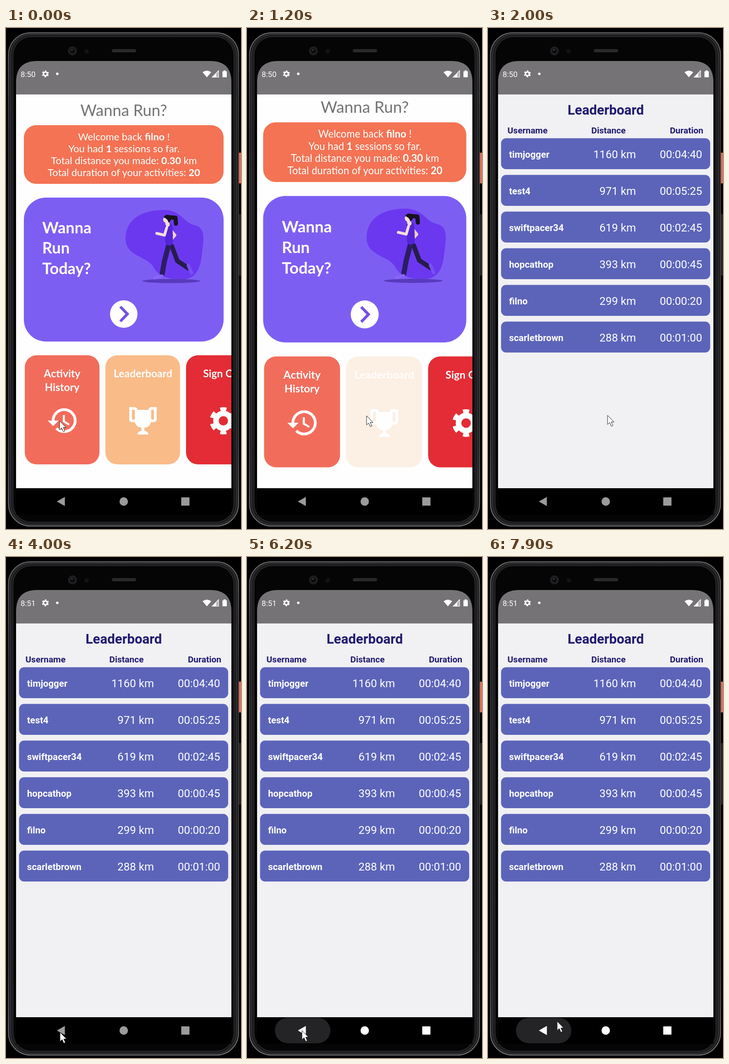
These frames come from a looping animation (513 by 1093 pixels, 8 s). An HTML page:

```html
<!DOCTYPE html>
<html lang="en">
<head>
<meta charset="utf-8">
<title>Running app</title>
<style>
  html, body { margin: 0; width: 100%; height: 100%; overflow: hidden; background: #000; }
  svg { display: block; width: 100%; height: 100%; }
  text { white-space: pre; }
  .app { font-family: Lato, "Open Sans", sans-serif; fill: #fff; }
  .sys { font-family: Roboto, Inter, sans-serif; fill: #fff; }
  .mid { text-anchor: middle; }
  .end { text-anchor: end; }
  .bold { font-weight: 700; }
  .navy { fill: #201b70; }
</style>
</head>
<body>
<svg viewBox="0 0 513 1093">
  <defs>
    <clipPath id="screen"><path d="M22 1004V118Q22 72 68 72H446Q492 72 492 118V1004Z"/></clipPath>
    <clipPath id="page"><rect x="22" y="145" width="470" height="859"/></clipPath>
    <linearGradient id="edge" x2="0" y2="1">
      <stop offset="0" stop-color="#6e6e70"/><stop offset=".2" stop-color="#3c3c3e"/>
      <stop offset=".8" stop-color="#454547"/><stop offset="1" stop-color="#77777a"/>
    </linearGradient>
    <g id="gear" fill="none" stroke="#fff">
      <circle r="5.4" stroke-width="4"/>
      <circle r="8.3" stroke-width="3.2" pathLength="6" stroke-dasharray=".5 .5" stroke-dashoffset="-.25"/>
    </g>
  </defs>

  <!-- phone -->
  <rect x="507" y="272" width="6" height="67" fill="#e2705b"/>
  <rect x="508" y="406" width="5" height="134" fill="#242426"/>
  <rect x="5.5" y="10.5" width="502" height="1076" rx="48" fill="#1b1b1d" stroke="url(#edge)" stroke-width="2"/>
  <rect x="10" y="14" width="493" height="1069" rx="44" fill="none" stroke="#4c4c4e"/>
  <rect x="15.5" y="19" width="482" height="1059" rx="40" fill="#050506" stroke="#39393b"/>
  <circle cx="145" cy="50" r="10" fill="#1d1d1f"/>
  <circle cx="145" cy="50" r="4.5" fill="#08080a"/>
  <circle cx="144" cy="48" r="1.5" fill="#5a5a60"/>
  <circle cx="176" cy="51" r="5" fill="#121214"/>
  <rect x="231" y="46" width="53" height="7" rx="3.5" fill="#29292b"/>
  <rect x="22" y="1004" width="470" height="58" fill="#000"/>

  <!-- status bar -->
  <rect x="22" y="72" width="470" height="74" fill="#757375" clip-path="url(#screen)"/>
  <text id="clock" class="sys" x="32" y="106.5" font-size="16.8"></text>
  <use href="#gear" transform="translate(86 100) scale(.76)"/>
  <g fill="#fff">
    <circle cx="112" cy="100" r="2.8"/>
    <path d="M438.500 107.500L429 96.500Q438.500 89.500 448 96.500Z"/>
    <path d="M450 107.500L464 93V107.500Z" fill="#b4b3b4"/>
    <path d="M450 107.500L459 98.200V107.500Z"/>
    <path d="M464 93V107.500H450Z" fill="none" stroke="#fff" stroke-width="1.200"/>
    <path d="M472.500 94.500H475V92.500H479.500V94.500H482V107.500H472.500Z"/>
  </g>

  <g clip-path="url(#page)">
    <rect x="22" y="145" width="470" height="859" fill="#fefefe"/>

    <g id="home" class="app">
      <text class="mid" x="257" y="192" font-size="34.5" fill="#757375">Wanna Run?</text>
      <rect x="39" y="212" width="436" height="128" rx="27" fill="#f37354"/>
      <g class="mid" font-size="21.8">
        <text x="257.500" y="245">Welcome back <tspan class="bold">filno</tspan> !</text>
        <text x="257.500" y="271">You had <tspan class="bold">1</tspan> sessions so far.</text>
        <text x="257.500" y="297">Total distance you made: <tspan class="bold">0.30</tspan> km</text>
        <text x="257.500" y="323">Total duration of your activities: <tspan class="bold">20</tspan></text>
      </g>

      <rect x="39" y="370" width="436" height="314" rx="48" fill="#7d5ef3"/>
      <g class="bold" font-size="34.300">
        <text x="79" y="448">Wanna</text>
        <text x="79" y="492">Run</text>
        <text x="79" y="537">Today?</text>
      </g>
      <path d="M261 458C262 415 300 396 348 397C385 400 386 424 412 430C434 436 433 455 428 490C425 525 415 545 390 548C362 549 335 546 322 522C308 496 260 500 261 458Z" fill="#6b38ef"/>
      <ellipse cx="361" cy="552" rx="63" ry="4.500" fill="#583bbd"/>
      <g fill="none" stroke-linecap="round" stroke-linejoin="round">
        <path d="M362 476L374 508L398 524" stroke="#251d4b" stroke-width="10"/>
        <path d="M398 518L405 534" stroke="#7a4ff5" stroke-width="7"/>
        <path d="M355 474L346 508L341 536" stroke="#2b1d63" stroke-width="11"/>
        <path d="M340 541L325 545" stroke="#8a64fa" stroke-width="7"/>
        <path d="M359 440L369 452L362 460" stroke="#f3cfc6" stroke-width="6"/>
        <path d="M355 434L356 466" stroke="#5425d6" stroke-width="17"/>
        <path d="M351 435L346 452L329 448" stroke="#f7ddd6" stroke-width="6"/>
        <path d="M351 420L353 429" stroke="#f7ddd6" stroke-width="9"/>
        <path d="M358 413L370 414L371 427" stroke="#17131f" stroke-width="9"/>
      </g>
      <circle cx="350" cy="418" r="7" fill="#f7ddd6"/>
      <path d="M344 413Q347 406 356 408Q364 412 359 421L355 425Q353 416 344 413Z" fill="#17131f"/>
      <circle cx="257" cy="624" r="30" fill="#fff"/>
      <path d="M249.500 608L265 624L249.500 640" fill="none" stroke="#7350e6" stroke-width="6"/>

      <g class="mid bold" font-size="22.900">
        <rect x="41" y="714" width="163" height="238" rx="26" fill="#f26c5b"/>
        <text x="122.500" y="761.500">Activity</text>
        <text x="122.500" y="791.500">History</text>
        <path transform="translate(88 820.500) scale(3)" d="M13 3c-4.970 0-9 4.030-9 9H1l4 4 4-4H6c0-3.870 3.130-7 7-7s7 3.130 7 7-3.130 7-7 7c-1.930 0-3.680-.790-4.940-2.060l-1.420 1.420C8.270 20 10.500 21 13 21c4.970 0 9-4.030 9-9s-4.030-9-9-9zm-1 5v5l4.280 2.540.720-1.210-3.500-2.080V8z"/>
        <g id="leaderCard">
          <rect x="217" y="714" width="163" height="238" rx="26" fill="#f9bb88"/>
          <text x="299" y="761.500">Leaderboard</text>
          <path transform="translate(263 821) scale(3)" d="M18 2c-.9 0-2 1-2 2H8c0-1-1.100-2-2-2H2v9c0 1 1 2 2 2h2.200c.4 2 1.700 3.700 4.800 4v2.080C8 19.540 8 22 8 22h8s0-2.460-3-2.920V17c3.100-.3 4.400-2 4.800-4H20c1 0 2-1 2-2V2zM6 11H4V4h2zm14 0h-2V4h2z"/>
        </g>
        <rect x="393" y="714" width="163" height="238" rx="26" fill="#e32c35"/>
        <text x="474.500" y="761.500">Sign Out</text>
        <use href="#gear" transform="translate(474.500 857) scale(3)"/>
      </g>
    </g>

    <g id="board" class="sys">
      <rect x="22" y="145" width="470" height="859" fill="#f1f0f3"/>
      <g class="bold">
        <text class="mid navy" x="257" y="189" font-size="29.400">Leaderboard</text>
        <g font-size="19.100">
          <text class="navy" x="42.500" y="229.500">Username</text>
          <text class="navy mid" x="263" y="229.500">Distance</text>
          <text class="navy end" x="470" y="229.500">Duration</text>
        </g>
      </g>
      <g id="rows"></g>
    </g>
  </g>

  <!-- navigation bar -->
  <rect id="ripple" x="-60.500" y="-28" width="121" height="56" rx="28" fill="#242426"/>
  <g id="nav">
    <path d="M111 1033L128.500 1023V1043Z"/>
    <circle cx="257" cy="1033" r="9.200"/>
    <rect x="382.500" y="1024" width="18" height="18" rx="1"/>
  </g>
  <path id="cursor" d="M0 0V20L4.500 15.700L8.200 23.800L11.600 22.300L8 14.500H14Z" fill="#fff" stroke="#222" stroke-width="1"/>
</svg>

<script>
const el = id => document.getElementById(id);
const clamp = v => Math.max(0, Math.min(1, v));
const span = (t, from, to) => clamp((t - from) / (to - from));
const smooth = u => u * u * (3 - 2 * u);
const zoom = s => `translate(257 574) scale(${s}) translate(-257 -574)`;

const runners = [
  ["timjogger", 1160, "04:40"],
  ["test4", 971, "05:25"],
  ["swiftpacer34", 619, "02:45"],
  ["hopcathop", 393, "00:45"],
  ["filno", 299, "00:20"],
  ["scarletbrown", 288, "01:00"]
];
el("rows").innerHTML = runners.map(([name, km, time], i) => `
  <g transform="translate(0 ${240.5 + 80 * i})" font-size="24">
    <rect x="28.500" width="456.500" height="67.500" rx="11" fill="#5c64b9"/>
    <text class="bold" x="46" y="42.500" font-size="20.300">${name}</text>
    <text class="end" x="323" y="43.500">${km} km</text>
    <text class="end" x="467.500" y="43.500">00:${time}</text>
  </g>`).join("");

// time, x, y of the pointer tip
const path = [
  [0, 117, 857], [400, 261, 846], [1600, 261, 846], [1700, 261, 845], [3100, 261, 845],
  [3700, 118, 1037], [4100, 118, 1037], [4300, 120, 1033], [7100, 120, 1033], [7900, 151, 1013]
];
function pointer(t) {
  const i = Math.max(1, path.findIndex(p => p[0] >= t));
  const [t0, x0, y0] = path[i - 1], [t1, x1, y1] = path[i];
  const u = smooth(span(t, t0, t1));
  return [x0 + (x1 - x0) * u, y0 + (y1 - y0) * u];
}

function draw(t) {
  el("clock").textContent = t < 3900 ? "8:50" : "8:51";
  el("cursor").setAttribute("transform", `translate(${pointer(t)})`);

  // tapped card fades, then the pages zoom past each other
  el("leaderCard").setAttribute("opacity", 1 - .78 * smooth(span(t, 750, 950)));
  const open = 1 - (1 - span(t, 1188, 1588)) ** 4;
  el("home").setAttribute("transform", zoom(1 + .15 * open));
  el("board").setAttribute("transform", zoom(.85 + .15 * open));
  el("board").setAttribute("opacity", span(t, 1238, 1320));
  el("rows").setAttribute("visibility", t < 1700 ? "hidden" : "visible");

  const press = smooth(span(t, 4100, 4500));
  el("ripple").setAttribute("transform", `translate(121.500 1033) scale(${press} 1)`);
  el("ripple").setAttribute("opacity", press);
  const grey = Math.round(155 + 100 * press);
  el("nav").setAttribute("fill", `rgb(${grey},${grey},${grey})`);
}

// the picture advances in steps of 100 ms
const start = performance.now();
function tick() {
  draw(Math.floor((performance.now() - start) % 8000 / 100) * 100);
  requestAnimationFrame(tick);
}
tick();
</script>
</body>
</html>
```
